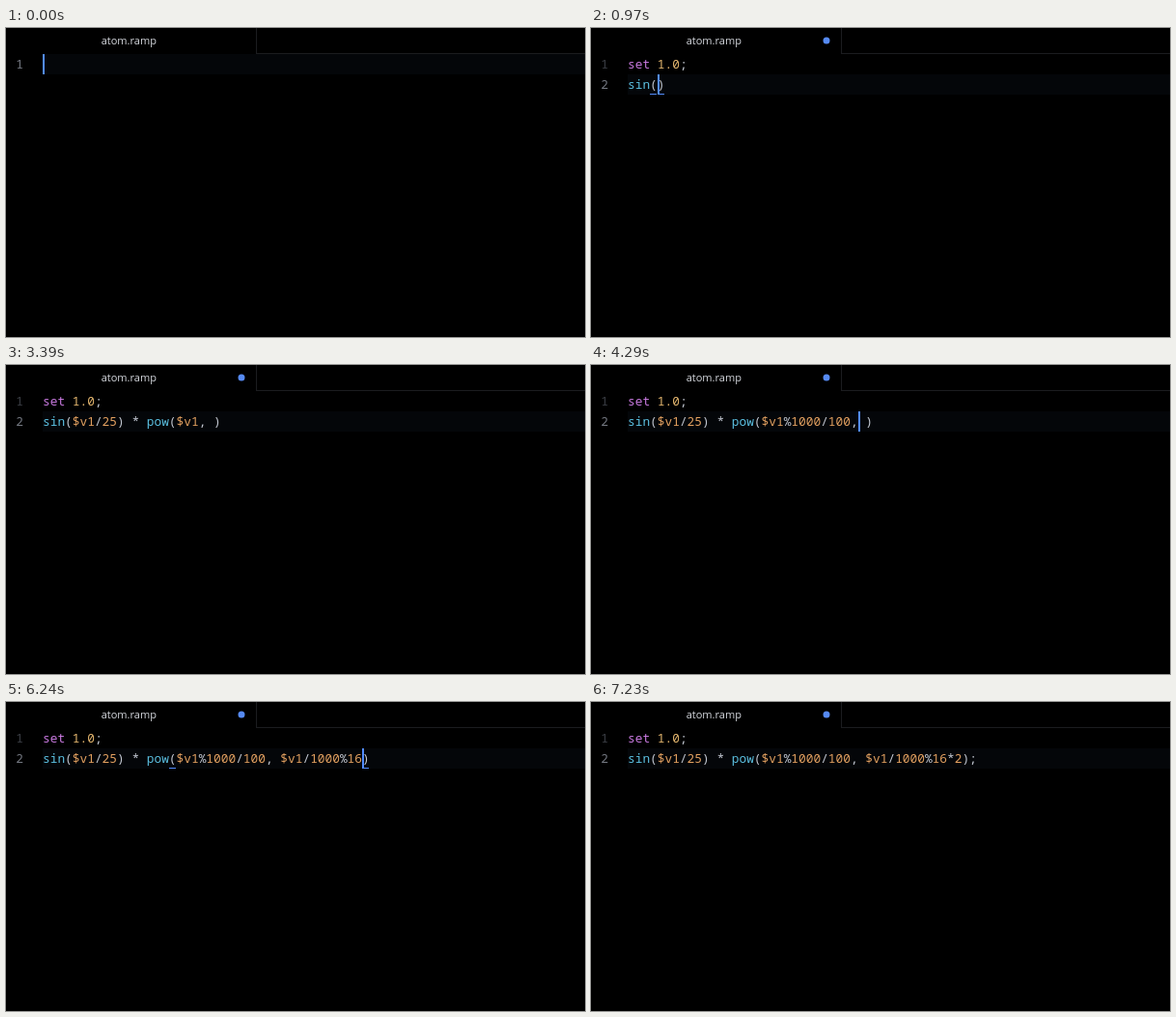
An HTML page with a canvas that plays this animation: 600x320 px, repeating every 7.29 s.

```html
<!DOCTYPE html>
<html lang="en">
<head>
<meta charset="utf-8">
<title>Typing in an editor</title>
<style>
html, body { margin: 0; width: 100%; height: 100%; overflow: hidden; background: #000; }
canvas { display: block; }
</style>
</head>
<body>
<canvas id="stage" width="600" height="320"></canvas>
<script>
const ctx = document.getElementById('stage').getContext('2d');
const LOOP = 7290, LEFT = 38, TOP = 27, LINE = 21, CHAR = 7.698;
const BLUE = '#528bff';

// Bursts of keys: start, end, keys. < and > move the caret, _ blinks it.
const bursts = [
  [30, 620, 'set 1.0;\n'], [680, 680, '_'],
  [770, 970, 'sin('], [1080, 1300, '$v1'], [1380, 1380, '_'],
  [1550, 2000, '/25> '], [2070, 2250, '____'],
  [2290, 2550, '* pow'], [2630, 2920, '($v1'], [2990, 2990, '_'],
  [3060, 3280, ', <<'], [3390, 3390, '_'], [3500, 3770, '%100'],
  [3870, 4120, '0/100'], [4220, 4320, '>>'], [4400, 4740, '______'],
  [4890, 5200, '$v1'], [5240, 5510, '/1000'],
  [5760, 5760, '%'], [5830, 5970, '__'], [6060, 6180, '16'],
  [6310, 6310, '*'], [6390, 6470, '__'],
  [6560, 6850, '2>;'], [6950, 7230, '___']
];
const events = bursts.flatMap(([start, end, keys]) => [...keys].map((key, i) =>
  ({ key, time: start + (end - start) * i / Math.max(1, keys.length - 1) })));

const tokens = [
  [/^set\b/, '#c678dd'],
  [/^(sin|pow)\b/, '#5bbfe0'],
  [/^\d+\.\d*/, '#e5b76f'],
  [/^(\$v1|\d+)/, '#e2a060'],
  [/^[^]/, '#c3c8d2']
];

function editorAt(time) {
  let text = '', caret = 0, visible = true;
  for (const { key, time: when } of events) {
    if (when > time + 0.01) break;
    if (key === '_') { visible = !visible; continue; }
    visible = true;
    if (key === '<') caret--;
    else if (key === '>') caret++;
    else {
      text = text.slice(0, caret) + (key === '(' ? '()' : key) + text.slice(caret);
      caret++;
    }
  }
  return { text, caret, visible };
}

function rect(color, x, y, w, h) {
  ctx.fillStyle = color;
  ctx.fillRect(x, y, w, h);
}

function write(text, x, y, color) {
  ctx.fillStyle = color;
  [...text].forEach((char, i) => ctx.fillText(char, x + i * CHAR, y));
}

function writeCode(code, y) {
  for (let col = 0; col < code.length;) {
    const rest = code.slice(col);
    const [pattern, color] = tokens.find(([p]) => p.test(rest));
    const word = rest.match(pattern)[0];
    write(word, LEFT + col * CHAR, y, color);
    col += word.length;
  }
}

// Columns of the bracket pair touching the caret.
function bracketPair(line, col) {
  const near = [col, col - 1].find(i => line[i] === '(' || line[i] === ')');
  if (near === undefined) return [];
  return line[near] === '('
    ? [near, line.indexOf(')', near)]
    : [line.lastIndexOf('(', near), near];
}

function drawTab(modified) {
  rect('#1b1c1f', 259, 0, 1, 27);
  rect('#1b1c1f', 259, 26, 341, 1);
  ctx.font = '11px "Open Sans", "Noto Sans", sans-serif';
  ctx.textAlign = 'center';
  ctx.fillStyle = '#d7dae0';
  ctx.fillText('atom.ramp', 127.3, 17);
  ctx.textAlign = 'left';
  if (!modified) return;
  ctx.fillStyle = '#568af2';
  ctx.beginPath();
  ctx.arc(244, 13, 3.5, 0, Math.PI * 2);
  ctx.fill();
}

function draw(time) {
  const { text, caret, visible } = editorAt(time);
  const lines = text.split('\n');
  const before = text.slice(0, caret).split('\n');
  const row = before.length - 1, col = before[row].length;
  const rowTop = TOP + row * LINE;

  rect('#000', 0, 0, 600, 320);
  drawTab(text !== '');
  rect('#040609', LEFT, rowTop, 600 - LEFT, LINE);

  ctx.font = '12.83px "Noto Sans Mono", "DejaVu Sans Mono", monospace';
  lines.forEach((line, i) => {
    const y = TOP + i * LINE + 15;
    write(String(i + 1), 10.3, y, i === row ? '#737780' : '#3a3d44');
    writeCode(line, y);
  });

  for (const c of bracketPair(lines[row], col))
    rect(BLUE, Math.round(LEFT + c * CHAR), rowTop + LINE - 1, 7, 1);
  if (visible) rect(BLUE, Math.round(LEFT + col * CHAR), rowTop, 2, LINE);
}

const began = performance.now();
function tick() {
  draw((performance.now() - began) % LOOP);
  requestAnimationFrame(tick);
}
tick();
</script>
</body>
</html>
```
